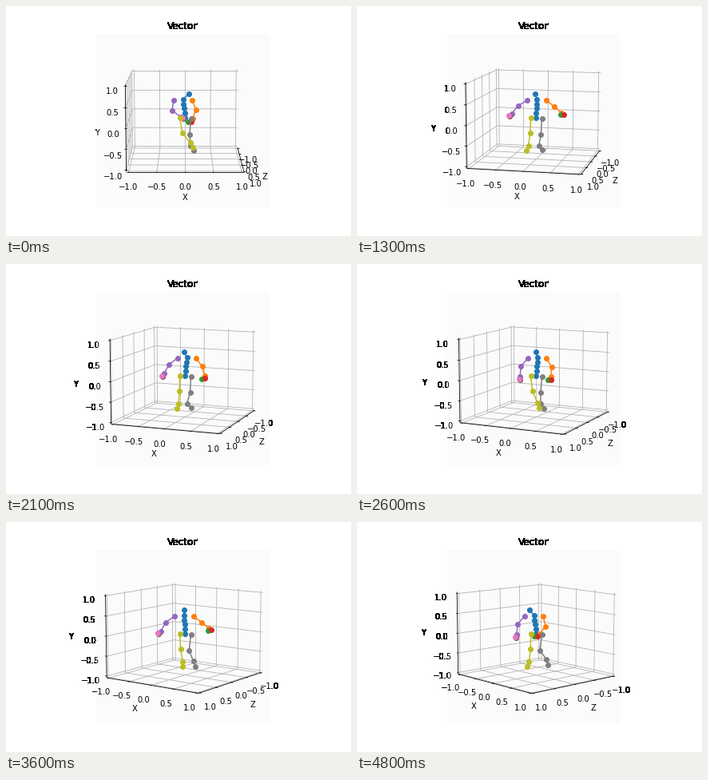
These frames come from a looping animation (432x288 px, 4.9 s). A matplotlib script:

```python
import numpy as np
import matplotlib.pyplot as plt
from matplotlib.animation import FuncAnimation
from matplotlib.collections import LineCollection
from matplotlib.patches import Rectangle

W, H = 432, 288
FRAMES, STEP = 49, 100

# camera and box
ELEV = np.radians(10)
BOX = np.array([4, 4, 3]) * 1.8294640721620434 / np.sqrt(41) / 2
SIDE = 0.755 * H
SCALE = SIDE / 0.185
LEFT, BOTTOM = 0.5125 * W - SIDE / 2, 0.125 * H
CENTER = np.array([LEFT, BOTTOM]) + 0.095 * SCALE

EDGE = 25 / 24                    # walls sit just outside the +-1 ticks
UNIT = 48 / (2 * SIDE) / 6        # one point of padding in data units
TICK_AT = EDGE + 11.5 * UNIT
LABEL_AT = EDGE + 25 * UNIT
TICKS = np.linspace(-1, 1, 5)

# each axis: direction, side of the box it runs along, outward tick direction
AXES = [
    ("X", 0, (0, -1, -1), (0, -1, 0)),
    ("Z", 1, (1, 0, -1), (1, 0, 0)),
    ("Y", 2, (-1, -1, 0), (-1, 0, 0)),
]
BACK = np.array([-1, 1, -1]) * EDGE

# each limb swings with one driver, eased through these key points
KEYS = np.array([0, 8, 13, 21, 31, 40, 48])
HEAD = [7, 0, -2, -4, 0, -1, -6]
ARM_R = [0, 1.1, 0.6, 0.3, 0.15, 0.85, -0.15]
ARM_L = [-0.6, 1.05, 0.65, 0.5, 0.05, 0.85, 0.2]
LEG_R = [-0.2, 0.6, -0.95, -1.2, 0.4, 0.8, 1.45]
LEG_L = [1.3, -1.3, -0.4, -0.25, 1.45, -0.65, -0.3]

# bones: length, rest angle from straight down, degrees per unit of driver
ARM_R_BONES = [(13, 20, 52), (12, -20, 115)]
ARM_L_BONES = [(13.5, -32, -40), (13, 9, -75)]
LEG_R_BONES = [(20, -5, -2), (14.5, 8, 20), (7, 30, -14)]
LEG_L_BONES = [(19.5, 1, 7), (15.5, 2, 28), (6.5, -12, 35)]


def drive(values, t):
    """Smooth cubic path through a driver's key points."""
    v = np.array(values, float)
    vel = np.gradient(v, KEYS)
    k = min(np.searchsorted(KEYS, t, "right") - 1, len(KEYS) - 2)
    d = KEYS[k + 1] - KEYS[k]
    s = (t - KEYS[k]) / d
    ease = s * s * (3 - 2 * s)
    return (v[k] * (1 - ease) + v[k + 1] * ease
            + d * s * (1 - s) * (vel[k] * (1 - s) - vel[k + 1] * s))


def limb(root, bones, swing):
    pts = [np.array(root, float)]
    for length, rest, gain in bones:
        a = np.radians(rest + gain * swing)
        pts.append(pts[-1] + length * np.array([np.sin(a), np.cos(a)]))
    return np.array(pts)


def arm(root, bones, swing, spread):
    """Arm chain plus two loose hand points past the wrist."""
    pts = limb(root, bones, swing)
    tip = pts[-1] + 0.3 * (pts[-1] - pts[-2])
    return pts, tip[None], (tip + spread)[None]


def skeleton(t):
    hip = np.array([224.2, 140])
    neck = np.array([224 + 2.5 * np.sin(2 * np.pi * (t - 9) / 48), 116.8])
    head = neck + [drive(HEAD, t), -6.5]
    arm_r, thumb_r, hand_r = arm(neck + [11.5, 1], ARM_R_BONES,
                                 drive(ARM_R, t), (-4, 0.3))
    return [
        np.vstack([head, np.linspace(neck, hip, 5)]),
        arm_r, hand_r, thumb_r,
        *arm(neck + [-11.8, 0.8], ARM_L_BONES, drive(ARM_L, t), (-1, -1)),
        limb(hip + [7.3, 0.8], LEG_R_BONES, drive(LEG_R, t)),
        limb(hip + [-6.6, 0], LEG_L_BONES, drive(LEG_L, t)),
    ]


def project(points, azim):
    p = np.asarray(points, float) * BOX
    ca, sa, ce, se = np.cos(azim), np.sin(azim), np.cos(ELEV), np.sin(ELEV)
    depth = 10 - p @ [ca * ce, sa * ce, se]
    right = p @ [-sa, ca, 0]
    up = p @ [-ca * se, -sa * se, ce]
    return CENTER + SCALE * np.stack([right, up], -1) / depth[..., None]


def along(axis, side, dist, value):
    """Point on an axis, pushed out from the box centre to dist."""
    p = np.array(side, float) * dist
    p[axis] = value
    return p


def grid_line(axis, value):
    """Line across the two back walls that meet at this tick."""
    pts = np.tile(BACK, (3, 1))
    a, b = [k for k in range(3) if k != axis]
    pts[0, a] *= -1
    pts[2, b] *= -1
    pts[:, axis] = value
    return pts


def drop_alpha(img, dpi):
    """Outside the panel every touched pixel turns solid black."""
    rgb, a = img[..., :3].copy(), img[..., 3]
    rgb[a < 0.99] = 0
    rgb[a < 1.5 / 255] = 1
    out = np.dstack([rgb, np.ones_like(a)])
    return np.rint(out * 255).astype(np.uint8), 0, 0


fig = plt.figure(figsize=(W / 72, H / 72), dpi=72)
fig.patch.set_visible(False)
fig.set_agg_filter(drop_alpha)
ax = fig.add_axes([0, 0, 1, 1])
ax.set(xlim=(0, W), ylim=(0, H))
ax.axis("off")
ax.add_patch(Rectangle((0, 0), W, H, fc=(1, 1, 1, 1 / 255), lw=0, zorder=0))
ax.add_patch(Rectangle((LEFT, BOTTOM), SIDE, SIDE, fc="#fbfbfb", lw=0, zorder=0.1))
ax.text(LEFT + SIDE / 2, BOTTOM + SIDE + 6, "Vector", size=12, ha="center")

grid = ax.add_collection(LineCollection([], colors="#b0b0b0", lw=0.8, zorder=1),
                         autolim=False)
frame = ax.add_collection(LineCollection([], colors="black", lw=0.8, zorder=1.1),
                          autolim=False)
parts = [ax.plot([], [], "o-", color=f"C{k}", lw=1.5, ms=6, zorder=3)[0]
         for k in range(9)]

labels = []
for name, axis, side, _ in AXES:
    txt = ax.text(0, 0, name, size=10, ha="center", va="center", zorder=2)
    labels.append((txt, along(axis, side, LABEL_AT, 0)))
    for v in TICKS:
        shown = -v + 0.0 if name == "Z" else v
        txt = ax.text(0, 0, f"{shown:.1f}".replace("-", "\u2212"),
                      size=10, ha="center", va="top", zorder=2)
        labels.append((txt, along(axis, side, TICK_AT, v)))

grid_pts = [grid_line(axis, v) for _, axis, _, _ in AXES for v in TICKS]
frame_pts = []
for _, axis, side, out in AXES:
    frame_pts.append([along(axis, side, EDGE, s * EDGE) for s in (-1, 1)])
    for v in TICKS:
        base = along(axis, side, EDGE, v)
        frame_pts.append([base + np.array(out) / 30, base - np.array(out) / 60])


def update(i):
    azim = np.radians(i - 90)
    grid.set_segments([project(p, azim) for p in grid_pts])
    frame.set_segments([project(p, azim) for p in frame_pts])
    for txt, p in labels:
        txt.set_position(project(p, azim))
    for line, pts in zip(parts, skeleton(i)):
        line.set_data(pts[:, 0], H - pts[:, 1])
    return []


anim = FuncAnimation(fig, update, frames=FRAMES, interval=STEP,
                     init_func=lambda: [], repeat=True)
plt.show()
```
